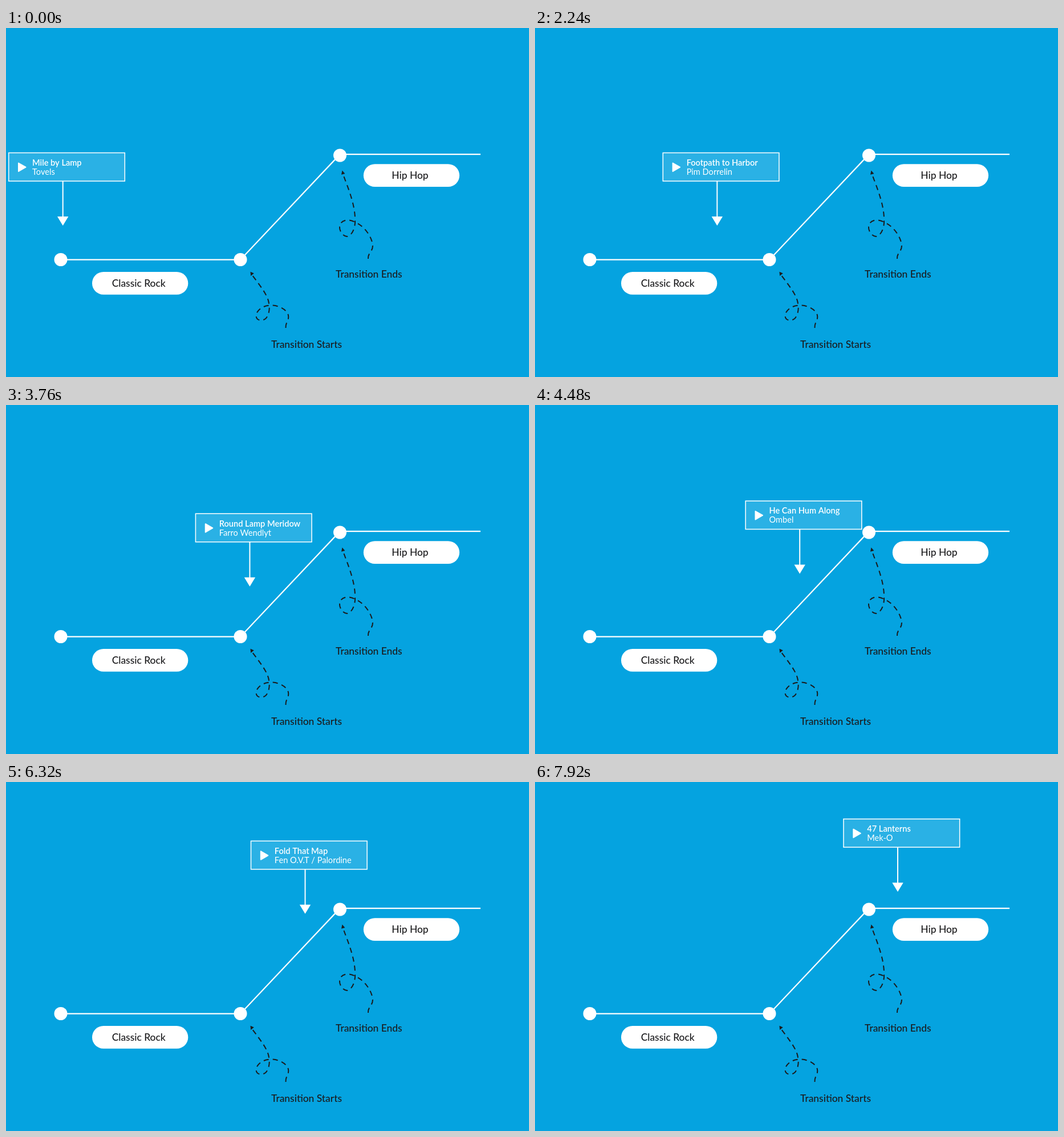
Write an HTML page with a canvas that moves like this. It is 917x611 px and loops after 8000 ms.

```html
<!DOCTYPE html>
<html lang="en">
<head>
<meta charset="utf-8">
<title>Playlist transition</title>
<style>
  html, body { margin: 0; width: 100%; height: 100%; overflow: hidden; background: #05a3e0; }
  canvas { display: block; width: 917px; height: 611px; }
</style>
</head>
<body>
<canvas id="stage" width="917" height="611"></canvas>
<script>
const ctx = document.getElementById('stage').getContext('2d');
const LOOP = 8000, STEP = 80, SONG = 1360;
const BLUE = '#05a3e0', WHITE = '#fff', INK = '#1b1b1d';
const FONT = 'Lato, "Open Sans", sans-serif';
const LABEL = '500 17.4px';

const songs = [
  ['Mile by Lamp', 'Tovels'],
  ['Footpath to Harbor', 'Pim Dorrelin'],
  ['Round Lamp Meridow', 'Farro Wendlyt'],
  ['He Can Hum Along', 'Ombel'],
  ['Fold That Map', 'Fen O.V.T / Palordine'],
  ['47 Lanterns', 'Mek-O']
];

// Card positions: [time, left, top]
const flat = [[0, 4, 218], [880, 93, 218], [1440, 149, 218], [1760, 179.3, 218], [2640, 260, 218]];
const climb = [
  [2720, 254, 217], [3040, 281, 208.7], [3520, 317, 196.5], [4480, 368.5, 167.5],
  [5280, 396.6, 137.7], [5680, 408.2, 125.7], [6160, 422, 108.5], [7040, 468.4, 79], [7920, 540.3, 64.2]
];

const slope = (a, b, k) => (b[k] - a[k]) / (b[0] - a[0]);

function tangent(keys, i, k) {
  const n = keys.length - 1;
  if (i === 0) return 2 * slope(keys[0], keys[1], k) - tangent(keys, 1, k);
  if (i === n) return 2 * slope(keys[n - 1], keys[n], k) - tangent(keys, n - 1, k);
  return (slope(keys[i - 1], keys[i], k) + slope(keys[i], keys[i + 1], k)) / 2;
}

// Cubic Hermite curve through the keys
function sample(keys, t, k) {
  let i = 0;
  while (i < keys.length - 2 && t > keys[i + 1][0]) i++;
  const a = keys[i], b = keys[i + 1], h = b[0] - a[0];
  const u = (t - a[0]) / h, v = 1 - u;
  return v * v * (1 + 2 * u) * a[k] + u * u * (3 - 2 * u) * b[k]
    + h * u * v * (v * tangent(keys, i, k) - u * tangent(keys, i + 1, k));
}

function line(width, ...pts) {
  ctx.strokeStyle = WHITE;
  ctx.lineWidth = width;
  ctx.beginPath();
  pts.forEach(p => ctx.lineTo(...p));
  ctx.stroke();
}

function poly(color, ...pts) {
  ctx.fillStyle = color;
  ctx.beginPath();
  pts.forEach(p => ctx.lineTo(...p));
  ctx.closePath();
  ctx.fill();
}

function dot(x, y) {
  ctx.fillStyle = WHITE;
  ctx.beginPath();
  ctx.arc(x, y, 11.5, 0, Math.PI * 2);
  ctx.fill();
}

function text(str, x, y, font, color, align = 'left') {
  ctx.font = font + ' ' + FONT;
  ctx.fillStyle = color;
  ctx.textAlign = align;
  ctx.fillText(str, x, y);
}

function pill(x, y, label) {
  ctx.fillStyle = WHITE;
  ctx.beginPath();
  ctx.roundRect(x, y, 168.3, 39.8, 19.9);
  ctx.fill();
  text(label, x + 81.7, y + 26, LABEL, INK, 'center');
}

const startCurl = new Path2D('M490.5 525C490 514 497 512 495 503C492 492 477 485 463 485.5' +
  'C448 486 438 497 438.5 504C439 512 448 514 455 509C461 503 463 492 461 482C459 468 447 453 432 433');
const endCurl = new Path2D('M635 404C634 394 643 392 643 381C642 366 628 346 612 340' +
  'C600 333 587 336 585 347C584 357 592 365 598 365C607 363 613 350 612 335C612 310 601 283 592 259');

function curl(path) {
  ctx.strokeStyle = INK;
  ctx.lineWidth = 2;
  ctx.setLineDash([9, 7]);
  ctx.stroke(path);
  ctx.setLineDash([]);
}

function drawChart() {
  ctx.fillStyle = BLUE;
  ctx.fillRect(0, 0, 917, 611);
  line(2.3, [96, 405.7], [411, 405.7], [585.5, 221.2], [832, 221.2]);
  dot(96, 405.5);
  dot(411, 405.5);
  dot(585.5, 223);
  pill(151, 427, 'Classic Rock');
  pill(626.8, 238.2, 'Hip Hop');
  curl(startCurl);
  poly(INK, [428.5, 426.8], [434.8, 429.5], [429.2, 434]);
  curl(endCurl);
  poly(INK, [589.5, 249.5], [594.3, 255], [588, 256.8]);
  text('Transition Starts', 465, 560, LABEL, INK);
  text('Transition Ends', 578, 437, LABEL, INK);
}

function drawCard(x, y, [title, artist]) {
  ctx.save();
  ctx.translate(x, y);
  ctx.fillStyle = 'rgba(255,255,255,.15)';
  ctx.fillRect(0, 0, 205, 50.5);
  ctx.strokeStyle = WHITE;
  ctx.lineWidth = 1.5;
  ctx.strokeRect(0.7, 0.5, 203.6, 49.5);
  line(2, [95.7, 50], [95.7, 113]);
  poly(WHITE, [86, 112], [105.4, 112], [95.7, 128]);
  ctx.lineJoin = 'round';
  poly(WHITE, [18, 18.5], [30.5, 25.7], [18, 33]);
  ctx.lineWidth = 2;
  ctx.stroke();
  text(title, 42, 22.8, '600 14.6px', WHITE);
  text(artist, 42, 38.8, '14.6px', WHITE);
  ctx.restore();
}

function render(now) {
  const t = Math.floor((now % LOOP) / STEP) * STEP;
  const keys = t < climb[0][0] ? flat : climb;
  drawChart();
  drawCard(sample(keys, t, 1), sample(keys, t, 2), songs[Math.floor(t / SONG)]);
}

const origin = performance.now();
function tick() {
  render(performance.now() - origin);
  requestAnimationFrame(tick);
}
tick();
</script>
</body>
</html>
```
